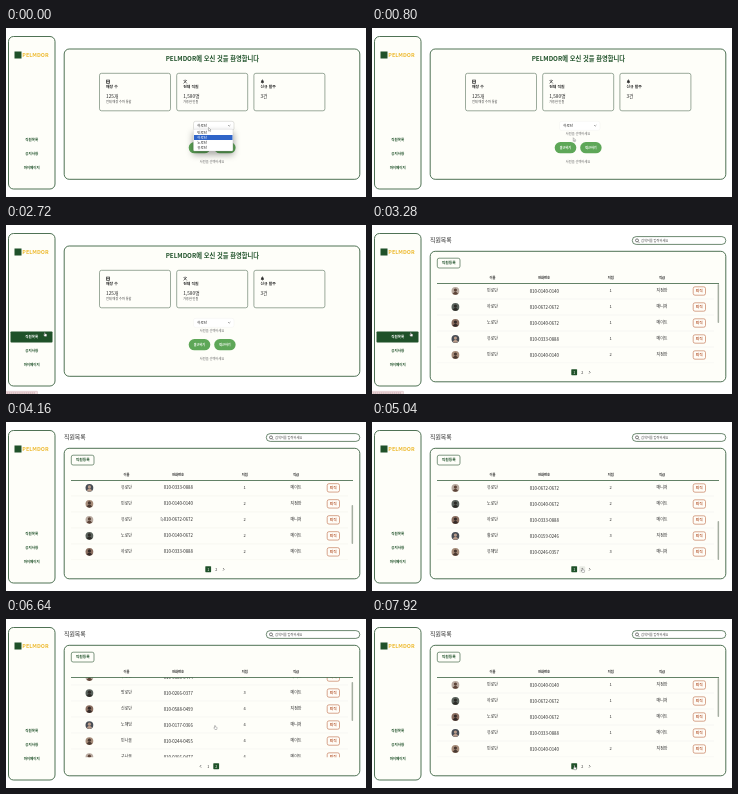
These frames come from a looping animation (360 px wide and 169 px high, 8 s). An HTML page:

```html
<!DOCTYPE html>
<html lang="ko">
<head>
<meta charset="utf-8">
<title>직원 관리</title>
<style>
html, body { margin: 0; width: 100%; height: 100%; overflow: hidden; background: #fff; }
svg { display: block; width: 100vw; height: 100vh; }
text { font-family: "Noto Sans CJK KR", "Noto Sans CJK", "Noto Sans", sans-serif; }
</style>
</head>
<body>
<svg id="stage" viewBox="0 0 360 169"></svg>
<script>
const DARK = '#1f5129', GREEN = '#5ea758', CREAM = '#fefef9', INK = '#2b2b2b';
const EDGE = '#3c6242', CARD = '#667d69', ORANGE = '#bd6a46';
const LOOP = 8000;
const stage = document.getElementById('stage');

function text(x, y, str, size, o = {}) {
  const { fill = INK, weight = 500, anchor = 'middle', id = '' } = o;
  return `<text ${id && `id="${id}"`} x="${x}" y="${(y + size * 0.36).toFixed(2)}" font-size="${size}"
    fill="${fill}" font-weight="${weight}" text-anchor="${anchor}">${str}</text>`;
}

function box(x, y, w, h, r, fill, stroke = 'none', line = 0.8, id = '') {
  return `<rect ${id && `id="${id}"`} x="${x}" y="${y}" width="${w}" height="${h}" rx="${r}"
    fill="${fill}" stroke="${stroke}" stroke-width="${line}"/>`;
}

// Sidebar
const menu = ['직원목록', '공지사항', '마이페이지'];
const sidebar = box(2.5, 8.5, 46.5, 152.5, 5, CREAM, EDGE, 0.9)
  + box(8.5, 23.5, 7, 7, 0, DARK)
  + text(29.5, 27, 'PELMDOR', 5.4, { fill: '#edb92e', weight: 900 })
  + box(4.5, 106.5, 42, 11, 0.8, DARK, 'none', 0, 'menuHover')
  + menu.map((m, i) => text(25.7, 111.5 + 14 * i, m, 3.5,
      { fill: DARK, weight: 700, id: 'menu' + i })).join('');

// Welcome page
const icons = [
  'M-1.8-1.5H1.8M-1.5-1.5V1.8H1.5V-1.5M-1.5 0H1.5',
  'M-1.6-1.5L1.6 1.8M1.6-1.5L-1.6 1.8M-.6-1.4H.6',
  'M-1.1.9Q-.9-1.7 0-1.7Q.9-1.7 1.1.9ZM-.3 1.6H.3'
];
const stats = [
  ['매장 수', '125개', '전체 매장 수와 통합'],
  ['전체 직원', '1,580명', '가용한 인원'],
  ['신규 발주', '3건', '']
];
const cards = stats.map(([label, value, note], i) => {
  const x = 93.5 + 77.2 * i, left = { anchor: 'start' };
  return box(x, 45.3, 71, 37.5, 2, CREAM, CARD, 0.65)
    + `<path d="${icons[i]}" transform="translate(${x + 8.5} 53.6)" fill="${i === 2 ? INK : 'none'}"
        stroke="${INK}" stroke-width=".7"/>`
    + text(x + 6.5, 59, label, 3.9, { ...left, weight: 700 })
    + text(x + 6.5, 68.2, value, 4.8, left)
    + text(x + 6.5, 73.8, note, 3.1, { ...left, fill: '#444' });
}).join('');

const people = ['민로단', '하로단', '노로단', '유로단'];
const options = people.map((name, i) =>
  (i === 1 ? box(188, 107, 38.5, 5, 0, '#2f64c8') : '')
  + text(191.2, 104.3 + 5.2 * i, name, 3.6, { anchor: 'start', fill: i === 1 ? '#fff' : INK })).join('');

const hint = y => text(206, y, '사원을 선택하세요', 3.2, { fill: '#666' });
const home = box(58.2, 21, 295.6, 130.3, 5, CREAM, EDGE, 0.9)
  + text(206.3, 31.2, 'PELMDOR에 오신 것을 환영합니다', 6.25, { fill: DARK, weight: 700 })
  + cards
  + box(187.5, 93.3, 40.5, 9, 2, '#fff', '#eeeee8', 0.5, 'select')
  + text(191.2, 97.6, people[1], 3.6, { anchor: 'start' })
  + '<path d="M222 97l1.2 1.2 1.2-1.2" fill="none" stroke="#555" stroke-width=".5"/>'
  + hint(105.4)
  + box(182.7, 114, 21.6, 11.3, 5.6, GREEN, 'none', 0, 'inBtn')
  + box(208.2, 114, 21.4, 11.3, 5.6, GREEN)
  + text(193.5, 119.6, '출근하기', 3.1, { fill: '#fff', weight: 700 })
  + text(218.9, 119.6, '퇴근하기', 3.1, { fill: '#fff', weight: 700 })
  + hint(133.8)
  + `<filter id="blur" x="-50%" y="-50%" width="200%" height="200%"><feGaussianBlur stdDeviation="3"/></filter>
     <g id="dropdown"><g filter="url(#blur)">${box(186.5, 104, 41.5, 23, 2, '#0005')}</g>
     ${box(187.5, 101.3, 39.4, 21.6, 1, '#fff', '#ccc', 0.3)}${options}</g>`;

// Staff list
const BOSS = '지점장', MANAGER = '매니저', MATE = '메이트';
const A = '0140-0140', B = '0672-0672', C = '0140-0672', D = '0333-0888';
const staff = [
  [
    ['민로단', A, 1, BOSS], ['하로단', B, 1, MANAGER], ['노로단', C, 1, MATE], ['유로단', D, 1, MATE],
    ['민로단', A, 2, BOSS], ['유로단', B, 2, MANAGER], ['노로단', C, 2, MATE], ['하로단', D, 2, MATE],
    ['황로단', '0159-0246', 3, BOSS], ['유해담', '0246-0357', 3, MANAGER]
  ],
  [
    ['구로단', '0188-0444', 3, MATE], ['방로단', '0266-0377', 3, MATE], ['신로단', '0588-0499', 4, BOSS],
    ['노해담', '0177-0366', 4, MANAGER], ['민나울', '0244-0455', 4, MATE], ['구나울', '0366-0477', 4, MATE],
    ['하나울', '0155-0522', 5, BOSS], ['신해담', '0255-0533', 5, MANAGER], ['방나울', '0355-0544', 5, MATE],
    ['황나울', '0455-0566', 5, MATE]
  ]
];
const tones = [['#b9aaa0', '#5d4438'], ['#59615b', '#2d2b27'], ['#8a6e60', '#352a28'],
  ['#484d55', '#b79a89'], ['#a58b79', '#4a3931']];

function avatar(y, i) {
  const [back, front] = tones[i % tones.length];
  return `<circle cx="83.4" cy="${y}" r="3.9" fill="${back}"/>
    <circle cx="83.4" cy="${y - 0.9}" r="1.6" fill="${front}"/>
    <path d="M80.7 ${y + 2.7}Q83.4 ${y - 1.2} 86.1 ${y + 2.7}Q83.4 ${y + 5} 80.7 ${y + 2.7}" fill="${front}"/>`;
}

function row([name, phone, shop, rank], i) {
  const y = 66 + 16 * i;
  return avatar(y, i)
    + text(120.5, y, name, 4)
    + text(172.3, y, '010-' + phone, 4.3)
    + text(238.7, y, shop, 4)
    + text(290, y, rank, 4)
    + box(321.2, y - 4.2, 12.3, 8.4, 1.8, '#fffdf8', ORANGE, 0.6)
    + text(327.3, y, '퇴직', 3.8, { fill: ORANGE, weight: 700 })
    + `<path d="M65 ${y + 8}H342" stroke="#eeeeea" stroke-width=".5"/>`;
}

const heads = [[120.5, '이름'], [172, '전화번호'], [238.7, '지점'], [290, '직급']];
const list = text(58, 15.2, '직원목록', 5.9, { anchor: 'start' })
  + box(260.3, 11.6, 93.5, 7.8, 3.9, '#fff', EDGE, 0.75)
  + `<path d="M266.2 16.7l1.1 1.1" stroke="${INK}" stroke-width=".6"/>
     <circle cx="265" cy="15.4" r="1.5" fill="none" stroke="${INK}" stroke-width=".6"/>`
  + text(269, 15.4, '검색어를 입력하세요', 3.2, { anchor: 'start', fill: '#444' })
  + box(58.2, 26.3, 295.6, 130.5, 5, CREAM, EDGE, 0.9)
  + box(65.3, 33.2, 22.7, 9.8, 1.8, CREAM, EDGE, 0.65)
  + text(76.7, 38.1, '직원등록', 3.8, { fill: DARK, weight: 700 })
  + heads.map(([x, s]) => text(x, 52.9, s, 3.3, { weight: 700 })).join('')
  + '<clipPath id="view"><rect x="64" y="58.6" width="280" height="79.6"/></clipPath><g clip-path="url(#view)">'
  + staff.map((rows, i) => `<g id="rows${i}">${rows.map(row).join('')}</g>`).join('') + '</g>'
  + `<path d="M65 58.5H347" stroke="${EDGE}" stroke-width=".8"/>`
  + box(345.6, 59, 1.5, 39, 0.75, '#a5ae a1'.replace(' ', ''), 'none', 0, 'thumb')
  + box(0, 144.2, 6, 6.2, 1, '#e9ebe4', 'none', 0, 'pageHover')
  + box(0, 144.2, 5.8, 6, 0.6, DARK, 'none', 0, 'pageBox')
  + [0, 1].map(i => text(202.2 + 8 * i, 147.2, i + 1, 3.6, { id: 'num' + i })).join('')
  + '<path id="chevron" fill="none" stroke="#444" stroke-width=".6"/>';

const pointer = `<g id="cursor" fill="#fff" stroke="#444" stroke-width=".4" stroke-linejoin="round">
  <path id="arrow" d="M0 0V4.5L1.1 3.5 1.8 5.1 2.5 4.8 1.8 3.2H3.2Z"/>
  <path id="hand" d="M-.5 2.6V.2Q0-.5.5.2V1.7L2.3 2.2Q2.8 2.4 2.6 3.2L2.1 5H-.1L-1.6 3Q-1.5 2.2-.5 2.8Z"/>
</g>`;

stage.innerHTML = `<rect width="360" height="169" fill="#fff"/>${sidebar}
  <g id="home">${home}</g><g id="list">${list}</g>
  <g id="status">${box(0, 166.3, 31.5, 3, 0.5, '#f1dfe1', '#c9a9ae', 0.4)}<path d="M1 168H29" stroke="#a87f87" stroke-width=".6" stroke-dasharray="1.4 .5"/></g>${pointer}`;

// Motion: each key is [time, ...values]
const cursorKeys = [
  [0, 202.5, 99.5], [160, 202.5, 99.5], [480, 202, 109], [720, 202, 109], [1280, 189, 121.5],
  [1920, 189, 121.5], [2520, 38.8, 107.5], [3440, 38.8, 107.5], [3800, 155, 95], [4440, 155, 95],
  [4960, 210.5, 146.5], [5680, 210.5, 146.5], [6200, 209, 106.5], [7040, 209, 106.5],
  [7600, 202.5, 146.8], [8000, 202.5, 146.8]
];
const scrollKeys = [[0, 0], [3800, 0], [4160, 48], [4400, 80], [6280, 80], [6640, 8], [6880, 0], [8000, 0]];

const smooth = p => p * p * (3 - 2 * p);
function track(keys, t, ease = p => p) {
  const i = Math.max(1, keys.findIndex(k => k[0] > t));
  const a = keys[i - 1], b = keys[i];
  const p = ease((t - a[0]) / (b[0] - a[0]));
  return a.slice(1).map((v, n) => v + (b[n + 1] - v) * p);
}

const el = id => document.getElementById(id);
const set = (id, name, value) => el(id).setAttribute(name, value);
const show = (id, on) => set(id, 'display', on ? 'inline' : 'none');
const inside = (v, a, b) => v >= a && v < b;

function draw(t) {
  const [x, y] = track(cursorKeys, t, smooth);
  const [scroll] = track(scrollKeys, t);
  const atHome = t < 2880, open = t < 640;
  const page = inside(t, 5200, 7680) ? 1 : 0;

  const overMenu = inside(x, 4, 47) && inside(y, 106, 118);
  const overIn = atHome && !open && inside(x, 183, 204) && inside(y, 114, 125);
  const overPage = !atHome && inside(y, 143.5, 151)
    ? [0, 1].find(i => Math.abs(x - 202.2 - 8 * i) < 3.3) : undefined;

  show('home', atHome);
  show('list', !atHome);
  show('dropdown', open);
  set('select', 'stroke', open ? '#c4c4be' : '#f3f3ee');
  set('inBtn', 'fill', overIn ? DARK : GREEN);
  show('menuHover', overMenu);
  set('menu0', 'fill', overMenu ? '#fff' : DARK);
  show('status', inside(t, 2500, 3680));

  [0, 1].forEach(i => {
    show('rows' + i, i === page);
    set('rows' + i, 'transform', `translate(0 ${-scroll})`);
    set('num' + i, 'fill', i === page ? '#fff' : INK);
  });
  set('thumb', 'y', 59 + scroll / 2);
  set('pageBox', 'x', 199.3 + 8 * page);
  show('pageHover', overPage !== undefined);
  if (overPage !== undefined) set('pageHover', 'x', 199.2 + 8 * overPage);
  set('chevron', 'd', page ? 'M195.2 146l-1.2 1.3 1.2 1.3' : 'M217 146l1.2 1.3-1.2 1.3');

  const hand = overMenu || overIn || overPage !== undefined || inside(t, 6000, 7300);
  show('hand', hand);
  show('arrow', !hand);
  set('cursor', 'transform', `translate(${x} ${y}) scale(.8)`);
}

function tick() {
  draw(performance.now() % LOOP);
  requestAnimationFrame(tick);
}
tick();
</script>
</body>
</html>
```
